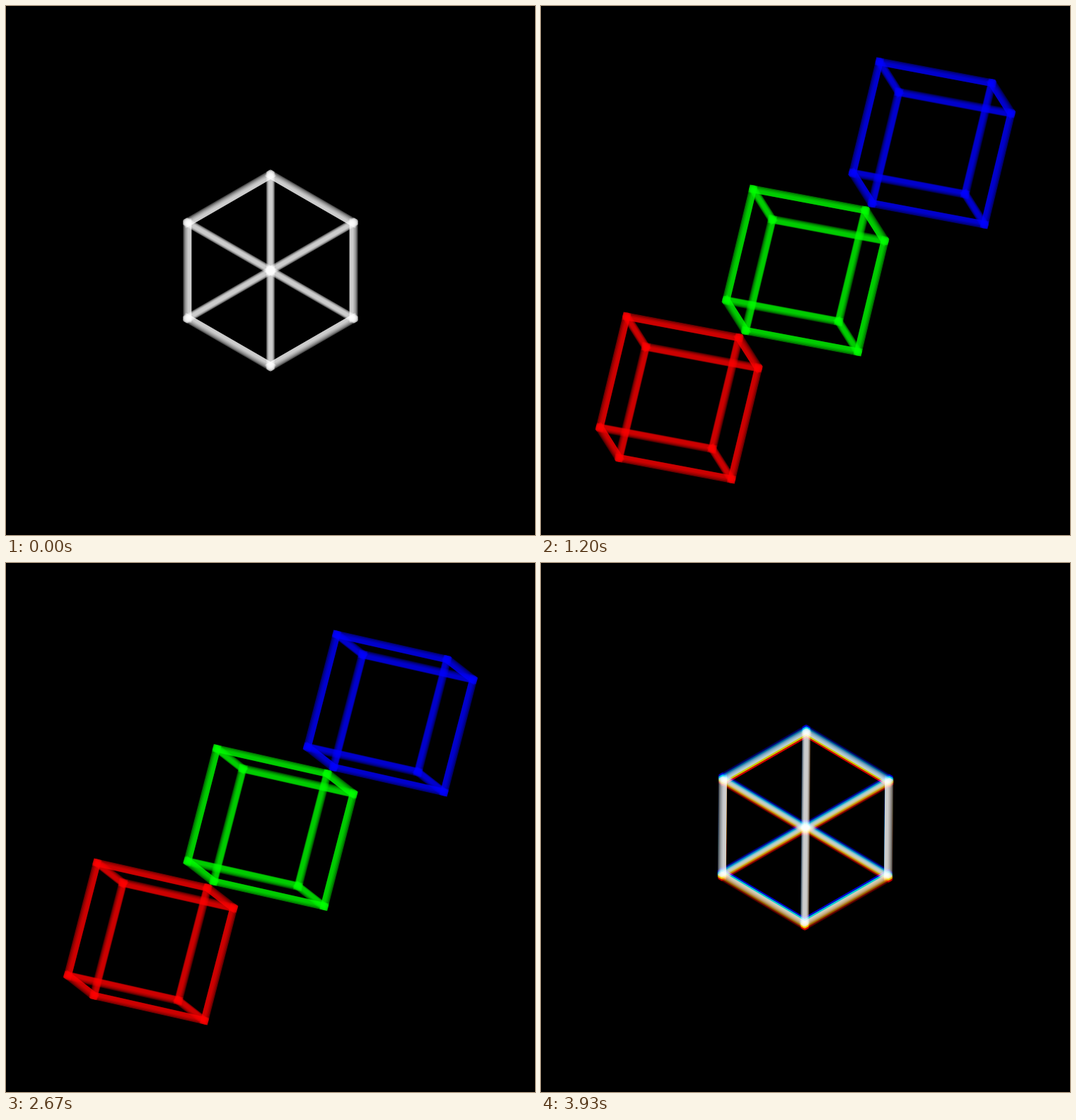
Animation of 748x748 px, one loop 3.99 s. Source, as an HTML page with a canvas:

```html
<!DOCTYPE html>
<html>
<head>
<meta charset="utf-8">
<title>Tumbling cubes</title>
<style>
html, body { margin: 0; width: 100%; height: 100%; overflow: hidden; background: #000; }
canvas { display: block; width: 748px; height: 748px; }
</style>
</head>
<body>
<canvas id="stage" width="748" height="748"></canvas>
<script>
const ctx = document.getElementById('stage').getContext('2d');
const LOOP = 3990, FRAME = 200 / 3, FRAMES = 60, TURN = 29;
const CENTER = 374, HALF = 87.5, BAR = 12;
const TILT = Math.atan(Math.SQRT1_2), RAD = Math.PI / 180;
const LAYERS = [12, 10.8, 9.5, 8, 6.5, 5];
const LEVEL = 60;

// Corner n has the sign of axis i in bit i.
const corners = [...Array(8).keys()].map(n => [0, 1, 2].map(i => n >> i & 1 ? 1 : -1));
const edges = [];
for (let n = 0; n < 8; n++)
  for (let i = 0; i < 3; i++)
    if (!(n >> i & 1)) edges.push([n, n | 1 << i]);

// Images of the three cube axes after turning about x, y, then z.
function turnedAxes(a, b, c) {
  const [sa, ca, sb, cb, sc, cc] = [a, b, c].flatMap(v => [Math.sin(v), Math.cos(v)]);
  const spin = (x, y, z) => [x * cc - y * sc, x * sc + y * cc, z];
  return [
    spin(cb, 0, -sb),
    spin(sb * sa, ca, cb * sa),
    spin(sb * ca, -sa, cb * ca)
  ];
}

function drawCube(axes, offset, color) {
  const project = (p, size) => [0, 1].map(k => {
    const v = axes.reduce((sum, axis, i) => sum + axis[k] * (p[i] * size + offset), 0);
    return CENTER + (k ? -v : v);
  });
  const [mx, my] = project([0, 0, 0], 0);

  // The outline is every corner except the nearest and the farthest.
  const near = axes.reduce((n, axis, i) => n | (axis[2] > 0 ? 1 << i : 0), 0);
  const outline = corners
    .filter((_, n) => n !== near && n !== 7 - near)
    .map(p => project(p, HALF))
    .sort((p, q) => Math.atan2(p[1] - my, p[0] - mx) - Math.atan2(q[1] - my, q[0] - mx));

  ctx.save();
  ctx.beginPath();
  outline.forEach(p => ctx.lineTo(...p));
  ctx.closePath();
  ctx.clip();
  ctx.strokeStyle = color;
  for (const width of LAYERS) {
    // Brighter cores sit closer to the inside of the bar.
    const size = HALF - (BAR - width / 2) * Math.SQRT1_2;
    const points = corners.map(p => project(p, size));
    ctx.lineWidth = width;
    for (const [m, n] of edges) {
      ctx.beginPath();
      ctx.moveTo(...points[m]);
      ctx.lineTo(...points[n]);
      ctx.stroke();
    }
  }
  ctx.restore();
}

function draw(time) {
  const frame = Math.min(FRAMES - 1, Math.floor((time % LOOP + 5) / FRAME));
  const u = frame < TURN ? frame / TURN : (FRAMES - frame) / (FRAMES - TURN);
  const ease = u * u * (3 - 2 * u);
  const axes = turnedAxes((45 - 180 * ease) * RAD, TILT * (2 * ease - 1), (30 - 60 * ease) * RAD);

  ctx.globalCompositeOperation = 'source-over';
  ctx.fillStyle = '#000';
  ctx.fillRect(0, 0, 748, 748);
  ctx.globalCompositeOperation = 'screen';
  ctx.lineCap = 'square';
  drawCube(axes, -2 * HALF, `rgb(${LEVEL},0,0)`);
  drawCube(axes, 0, `rgb(0,${LEVEL},0)`);
  drawCube(axes, 2 * HALF, `rgb(0,0,${LEVEL})`);
}

const start = performance.now();
function tick() {
  draw(performance.now() - start);
  requestAnimationFrame(tick);
}
tick();
</script>
</body>
</html>
```
